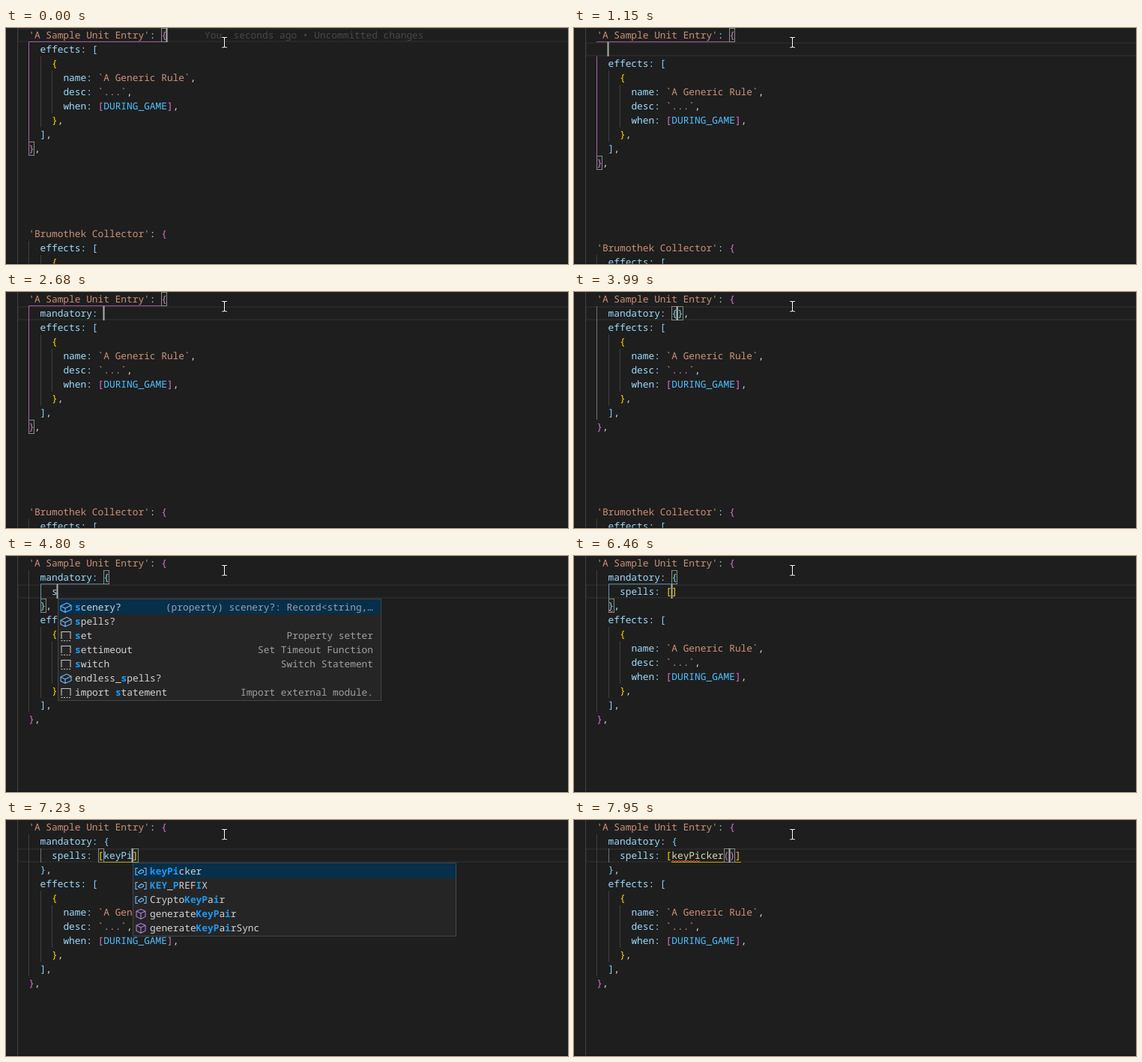
An HTML page for the animation above (8000 ms loop, 750 px wide and 316 px high).

```html
<!DOCTYPE html>
<html lang="en">
<head>
<meta charset="utf-8">
<title>Editor typing</title>
<style>
  html, body { margin: 0; width: 100%; height: 100%; overflow: hidden; background: #1e1e1e; }
  svg { display: block; }
  text {
    font: 12.83px "Noto Sans Mono", "DejaVu Sans Mono", monospace;
    white-space: pre;
    text-rendering: geometricPrecision;
  }
</style>
</head>
<body>
<svg id="stage" width="750" height="316" viewBox="0 0 750 316"></svg>
<script>
const stage = document.getElementById('stage');
const LOOP = 8000, LH = 19, CW = 7.698, LEFT = 14.8, POP_W = 432;
const BRACKETS = ['#ffd700', '#da70d6', '#87cefa'];
const KEY = '#9cdcfe', STR = '#ce9178', PLAIN = '#d4d4d4', CONST = '#4fc1ff', FUNC = '#dcdcaa';

const HEAD = ["  'A Sample Unit Entry': {"];
const TAIL = [
  '    effects: [',
  '      {',
  '        name: `A Generic Rule`,',
  '        desc: `...`,',
  '        when: [DURING_GAME],',
  '      },',
  '    ],',
  '  },',
  ...Array(5).fill('  '),
  "  'Brumothek Collector': {",
  '    effects: [',
  '      {'
];

// Suggestions: [icon, label, detail]; "|" marks where matching starts
const field = (label, detail) => ['field', label, detail];
const snippet = (label, detail) => ['snippet', label, detail];
const value = label => ['value', label];
const method = label => ['method', label];

const mandatory = field('mandatory?', '(property) mandatory?: Partial<Reco…');
const mList = [mandatory, field('mounts?'), field('artifact_|mods?')];
const sList = [
  field('scenery?', '(property) scenery?: Record<string,…'),
  field('spells?'),
  snippet('set', 'Property setter'),
  snippet('settimeout', 'Set Timeout Function'),
  snippet('switch', 'Switch Statement'),
  field('endless_|spells?'),
  snippet('import statement', 'Import external module.')
];
const spList = [field('spells?', '(property) spells?: Record<string, …'), sList[5]];
const pairList = [
  value('keyPicker'), value('KEY_PREFIX'), value('CryptoKeyPair'),
  method('generateKeyPair'), method('generateKeyPairSync')
];
const keyList = [
  ...pairList, value('CryptoKey'), value('KeyboardEvent'), value('KeyframeEffect'),
  method('generateKey'), method('createPublicKey'), method('createSecretKey'),
  method('createPrivateKey')
];

// Scope guides: vertical from row to row, optional horizontal up to a column
const outer = (from, to) => ({ col: 2, from, to, color: BRACKETS[1], alpha: .7, end: 26, at: 1 });
const idle = (col, from, to) => ({ col, from, to, color: '#707070', alpha: 1 });
const inner = { col: 4, from: 2, to: 3, color: BRACKETS[2], alpha: .6, end: 16, at: 2 };

const row1 = (word, extra) => ({ mid: ['    ' + word], cur: [1, 4 + word.length], ...extra });
const block = (word, extra) => ({
  mid: ['    mandatory: {', '      ' + word, '    },'], cur: [2, 6 + word.length], ...extra
});
const spell = (word, extra) => {
  const end = 15 + word.length;
  return block(`spells: [${word}]`, {
    cur: [2, end], box: [[2, 14], [2, end]], line: [2, 15, end], ...extra
  });
};
const outerBox = [[0, 25], [9, 2]], pairBox = [[1, 15], [1, 16]];

// Each step changes part of the state before it
const steps = [
  [0, { mid: [], cur: [0, 26], blame: true, box: [[0, 25], [8, 2]], guide: outer(1, 8), waves: [] }],
  [330, { hidden: true }],
  [840, { hidden: false }],
  [1150, { mid: ['  '], cur: [1, 4], blame: false, box: outerBox, guide: outer(2, 9) }],
  [1390, { mid: ['    '], guide: outer(1, 9) }],
  [1640, row1('m')],
  [1700, { pop: mList, query: 'm' }],
  [1760, row1('ma', { pop: [mandatory], query: 'ma', waves: [[2, 3, 4]] })],
  [1820, row1('man', { query: 'man' })],
  [1930, row1('mand', { query: 'mand' })],
  [2250, row1('mandatory', { pop: null })],
  [2560, row1('mandatory:')],
  [2620, row1('mandatory: ', { waves: [] })],
  [2690, row1('mandatory: {}', { cur: [1, 16] })],
  [2750, { box: pairBox, guide: idle(2, 1, 9) }],
  [3010, { cur: [1, 17], guide: outer(1, 9) }],
  [3200, { cur: [1, 16], guide: idle(2, 1, 9) }],
  [3260, { cur: [1, 17], guide: outer(1, 9) }],
  [3630, row1('mandatory: {},')],
  [3690, { box: outerBox }],
  [3810, { cur: [1, 17] }],
  [3870, { box: pairBox }],
  [3930, { cur: [1, 16] }],
  [3990, { guide: idle(2, 1, 9) }],
  [4110, block('', { box: [[1, 15], [3, 4]], guide: null })],
  [4350, { guide: inner }],
  [4620, block('s')],
  [4800, { pop: sList, query: 's' }],
  [4860, block('sp', { pop: spList, query: 'sp' })],
  [5310, block('spells', { pop: null })],
  [5670, block('spells:')],
  [5730, { waves: [[3, 4, 5]] }],
  [5840, block('spells: ')],
  [6280, block('spells: []', { cur: [2, 15] })],
  [6520, spell('', { guide: idle(4, 2, 3), waves: [] })],
  [6580, spell('k')],
  [6640, { pop: keyList, query: 'k' }],
  [6700, spell('ke', { query: 'ke' })],
  [6800, spell('key', { query: 'key' })],
  [7100, spell('keyP', { pop: pairList, query: 'keyp' })],
  [7230, spell('keyPi', { query: 'keypi' })],
  [7480, spell('keyPicker', { pop: null })],
  [7660, spell('keyPicker()', { cur: [2, 25] })],
  [7720, { box: [[2, 24], [2, 25]], line: [2, 15, 27] }],
  [7850, { waves: [[2, 15, 20]] }]
];
let last = {};
const states = steps.map(([at, change]) => last = { ...last, ...change, at });

const colX = col => LEFT + col * CW;
const pixel = col => Math.round(colX(col));

function add(name, attrs, content) {
  const node = document.createElementNS('http://www.w3.org/2000/svg', name);
  for (const key in attrs) node.setAttribute(key, attrs[key]);
  if (content !== undefined) node.textContent = content;
  stage.appendChild(node);
}
const rect = (x, y, width, height, fill, more) => add('rect', { x, y, width, height, fill, ...more });
const label = (x, y, fill, content, more) => add('text', { x, y, fill, ...more }, content);
const stroke = (d, color, width, more) =>
  add('path', { d, fill: 'none', stroke: color, 'stroke-width': width, ...more });

function drawCode(lines) {
  let depth = 1;
  const token = /'[^']*'|`[^`]*`|\w+|[{}()\[\]]|:|[^\s]/g;
  lines.forEach((line, row) => {
    for (const m of line.matchAll(token)) {
      const s = m[0];
      let color = PLAIN;
      if (/['`]/.test(s[0])) color = STR;
      else if ('{[('.includes(s)) color = BRACKETS[depth++ % 3];
      else if ('}])'.includes(s)) color = BRACKETS[--depth % 3];
      else if (/^[A-Z_]+$/.test(s)) color = CONST;
      else if (/\w|:/.test(s)) color = line[m.index + s.length] === '(' ? FUNC : KEY;
      label(colX(m.index), row * LH + 14, color, s);
    }
  });
}

function drawIndents(lines) {
  lines.forEach((line, row) => {
    const indent = line.match(/^ */)[0].length;
    for (let col = 0; col < indent; col += 2) rect(pixel(col), row * LH, 1, LH, '#404040');
  });
}

function drawGuide(g) {
  const x = pixel(g.col), more = { opacity: g.alpha };
  rect(x, g.from * LH, 1, (g.to - g.from) * LH, g.color, more);
  if (g.end) rect(x, g.at * LH - 1, pixel(g.end) - x, 1, g.color, more);
}

function drawWave([row, from, to]) {
  const y = row * LH + 18;
  let d = '';
  for (let x = pixel(from), i = 0; x <= pixel(to); x += 2, i++) d += `${i ? 'L' : 'M'}${x},${y - i % 2 * 2}`;
  stroke(d, '#f14c4c', 1);
}

const icons = {
  field: ['#75beff', 'M-7,-2L1,-6L7,-3V3L-1,6.5L-7,3.5ZM-7,-2L-1,1L7,-3M-1,1V6.5'],
  method: ['#b180d7', 'M0,-6.5L6,-4V3.5L0,6.5L-6,3.5V-4ZM-6,-4L0,-1L6,-4M0,-1V6.5'],
  value: ['#75beff', 'M-4,-4.5H-7V4.5H-4M4,-4.5H7V4.5H4M-3.5,1L1,-2.5L3.5,-1V1L-1,3L-3.5,1.5Z'],
  snippet: ['#c5c5c5', 'M-6,4V-5.5H6V4M-6.5,6.5h2m1.5,0h2m1.5,0h2m1.5,0h2']
};

function drawItem([icon, marked, detail], x, y, query) {
  const [color, d] = icons[icon];
  stroke(d, color, 1.1, { transform: `translate(${x + 11} ${y + 10})` });
  const start = Math.max(0, marked.indexOf('|'));
  const name = marked.replace('|', '');
  let hit = 0;
  [...name].forEach((c, i) => {
    const match = i >= start && hit < query.length && c.toLowerCase() === query[hit];
    if (match) hit++;
    label(x + 23 + i * CW, y + 14, match ? '#1a9bf5' : PLAIN, c, match ? { style: 'font-weight:600' } : {});
  });
  if (detail) label(x + 421, y + 14, PLAIN, detail, { 'text-anchor': 'end', opacity: .7 });
}

function drawPopup(items, query, [row, col]) {
  const x = pixel(col), y = (row + 1) * LH;
  rect(x + .5, y + .5, POP_W - 1, items.length * LH + 3, '#252526', { stroke: '#454545' });
  rect(x + 1, y + 1, POP_W - 2, 20, '#062f4a');
  items.forEach((item, i) => drawItem(item, x, y + 2 + i * LH, query));
}

function drawPointer() {
  const d = 'M288,12.5H290.5L291.5,13.5L292.5,12.5H295M291.5,13.5V25M288,26H290.5L291.5,25L292.5,26H295';
  stroke(d, '#000', 3);
  stroke(d, '#fff', 1.2);
}

function draw(s) {
  stage.textContent = '';
  const lines = [...HEAD, ...s.mid, ...TAIL];
  const [row, col] = s.cur, y = row * LH;
  rect(0, 0, 750, 316, '#1e1e1e');
  rect(16, y + 1, 740, LH - 2, 'none', { stroke: '#282828', 'stroke-width': 2 });
  drawIndents(lines);
  if (s.guide) drawGuide(s.guide);
  if (s.line) {
    const [r, from, to] = s.line;
    rect(pixel(from), r * LH + 18, pixel(to) - pixel(from), 1, BRACKETS[0], { opacity: .7 });
  }
  for (const [r, c] of s.box)
    rect(pixel(c) + .5, r * LH + .5, 7, 18, '#1c251c', { stroke: '#888' });
  drawCode(lines);
  if (s.blame) label(265, 14, '#494949', 'You, seconds ago • Uncommitted changes');
  s.waves.forEach(drawWave);
  if (!s.hidden) rect(Math.floor(colX(col)), y, 2, LH, '#aeafad', { transform: 'translate(-.5 0)' });
  if (s.pop) drawPopup(s.pop, s.query, s.cur);
  rect(0, 314, 750, 2, '#000', { opacity: .2 });
  drawPointer();
}

let shown = null;
function update(now) {
  const t = now % LOOP;
  const state = states.filter(s => s.at <= t).pop();
  if (state !== shown) draw(shown = state);
}
function tick() {
  update(performance.now());
  requestAnimationFrame(tick);
}
draw(shown = states[0]);
tick();
</script>
</body>
</html>
```
